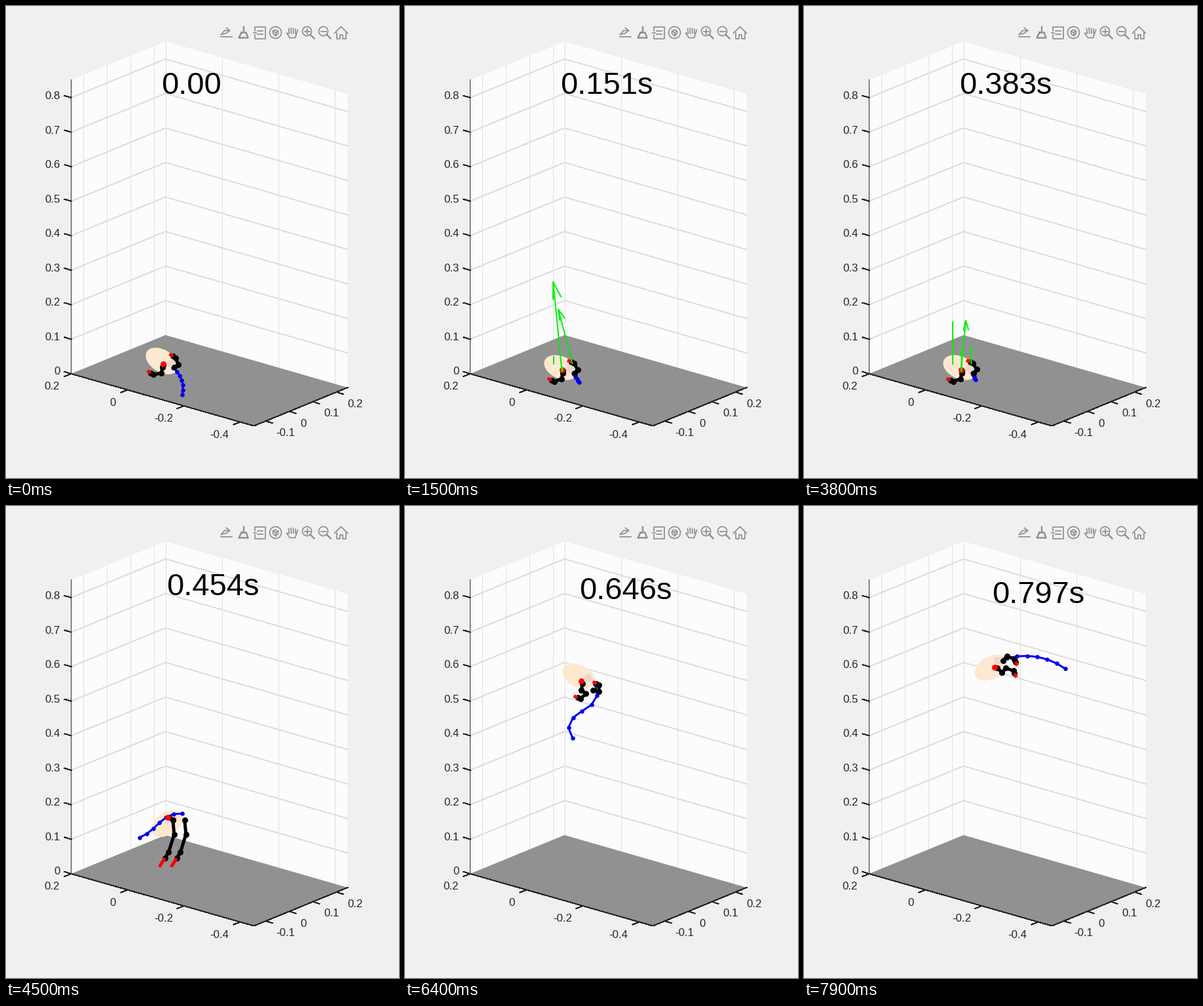
Animation, 600 px wide and 720 px high, one loop 8 s. Source, as a matplotlib script:

```python
import numpy as np
import matplotlib.pyplot as plt
from matplotlib.animation import FuncAnimation
from matplotlib.patches import Circle, Ellipse, Polygon

W, H, DPI = 600, 720, 100
FRAMES, INTERVAL = 80, 100
PX = 72 / DPI  # points per pixel

PAGE, WALL, FLOOR = "#f0f0f0", "#fcfcff", "#919191"
GRID, INK, ICON = "#dfdfe2", "#262626", "#8e8e8e"
SKIN, THIGH = "#fee9d0", "#f0d6cc"

LANDING, PUSH, TAKEOFF = 6, 38, 45

plt.rcParams["font.family"] = "Liberation Sans"
fig = plt.figure(figsize=(W / DPI, H / DPI), dpi=DPI, facecolor=PAGE)
ax = fig.add_axes([0, 0, 1, 1])
ax.set_xlim(-0.5, W - 0.5)
ax.set_ylim(H - 0.5, -0.5)
ax.axis("off")


def stroke(pts, color, width=1.0, z=2, **kw):
    x, y = zip(*pts) if len(pts) else ((), ())
    return ax.plot(x, y, color=color, lw=width * PX, zorder=z, **kw)[0]


def label(x, y, s, size=16.7, color=INK, **kw):
    return ax.text(x, y, s, fontsize=size * PX, color=color, zorder=3, **kw)


# ---- axes box ----
LEFT, BACK, RIGHT, FRONT = (99, 560.5), (243, 501.5), (521, 581.5), (378, 640)
HEIGHT, STEP = 448, 52.65


def mix(p, q, u):
    return p[0] + (q[0] - p[0]) * u, p[1] + (q[1] - p[1]) * u


def up(p, h):
    return p[0], p[1] - h


def crisp(pts, color, **kw):
    stroke(pts, color, 1, antialiased=False, **kw)


def tick(p, dx, dy, text, x, y, ha="center"):
    crisp([p, (p[0] + dx, p[1] + dy)], INK)
    label(x, y, text, ha=ha, va="center_baseline")


def draw_box():
    for a, b in ((LEFT, BACK), (BACK, RIGHT)):
        ax.add_patch(Polygon([a, b, up(b, HEIGHT), up(a, HEIGHT)], fc=WALL, ec="none", zorder=0))
    for h in STEP * np.arange(1, 9):
        crisp([up(p, h) for p in (LEFT, BACK, RIGHT)], GRID, z=1)
    for i in range(4):
        for p in (mix(LEFT, BACK, (18 + 36 * i) / 144), mix(BACK, RIGHT, 86 * i / 278)):
            crisp([p, up(p, HEIGHT)], GRID, z=1)
    ax.add_patch(Polygon([LEFT, BACK, RIGHT, FRONT], fc=FLOOR, ec="none", zorder=1.5))
    crisp([up(LEFT, HEIGHT), LEFT, FRONT, RIGHT], INK)

    for k in range(9):
        tick(up(LEFT, k * STEP), -10, -3, f"{k / 10:g}", 82.5, 556 - 52.55 * k, "right")
    for i in range(4):
        tick(mix(LEFT, FRONT, i * 86 / 279), -10, 4, f"{(1 - i) / 5:g}",
             70 + 85 * i + 8 * (i == 1), 578.5 + 24.7 * i)
        tick(mix(FRONT, RIGHT, (18 + 36 * i) / 143), 10, 3, f"{(i - 1) / 10:g}",
             426 + 35.5 * i - 8 * (i == 1), 650 - 15 * i)


# ---- toolbar ----
def icon(*lines, w=1.7):
    for pts in lines:
        stroke(pts, ICON, w, 3)


def ring(x, y, r):
    ax.add_patch(Circle((x, y), r, fc="none", ec=ICON, lw=1.7 * PX, zorder=3))


def draw_toolbar():
    icon([(327, 46), (344, 46)], [(328, 43), (333, 37), (341, 37)],
         [(336, 33), (341, 37), (336, 41), (328, 43)])
    icon([(362, 31), (362, 39)], [(359, 40), (366, 40), (369, 48), (355, 48), (359, 40)], w=2.4)
    icon([(379, 37), (379, 31), (395, 31), (395, 49), (379, 49), (379, 43)],
         [(377, 40), (381, 40)], [(383, 37), (391, 37)], [(383, 42), (391, 42)])
    ring(411, 40, 9)
    ring(411, 40, 4)
    icon([(411, 40), (411, 45)], [(407, 38), (411, 40), (415, 38)])
    icon([(431, 41), (428, 41), (433, 48), (441, 48), (445, 36)],
         *[[(431 + 3.5 * i, 33 + abs(i - 1.2)), (432 + 3.2 * i, 41)] for i in range(4)])
    for x in (459, 484):
        ring(x, 38, 7)
        icon([(x + 5, 43), (x + 11, 49)], w=2.4)
        icon([(x - 4, 38), (x + 4, 38)])
    icon([(459, 34), (459, 42)])
    icon([(501, 41), (511, 31), (521, 41)],
         [(504, 40), (504, 49), (509, 49), (509, 43), (513, 43), (513, 49), (518, 49), (518, 40)])


# ---- motion, with stage points as complex numbers ----
def lerp(n, *keys):
    t, v = zip(*keys)
    return np.interp(n, t, v)


def turn(degrees):
    return np.exp(1j * np.radians(degrees))


def drift(n):
    return lerp(n, (PUSH, 0), (52, 16), (64, 29), (79, 50))


def height(n):
    if n < PUSH:
        return min(541 + 0.26 * n * n, 551)  # drop onto the floor
    if n < TAKEOFF:
        return 551 - 67 * ((n - PUSH) / (TAKEOFF - PUSH)) ** 2
    m = n - 52
    return 374 - 9.583 * m + 0.3228 * m * (m - 12)  # free flight


def body_at(n):
    angle = lerp(n, (0, 32), (15, 24), (PUSH, 24), (52, -90), (64, 27), (79, -30))
    return 237.5 + 0.95 * drift(n) + 1j * height(n), angle


def hips(n):
    """Near and far hip; the pair twists late in the flight."""
    c, a = body_at(n)
    mid = c + turn(a) * lerp(n, (PUSH, 14 + 3j), (52, 22 + 8j), (64, 21 + 13j), (79, 16 + 7j))
    half = 9 * turn(lerp(n, (64, 0), (79, -85)))
    return mid - half, mid + half


def leg(n, hip, side):
    """Hip, knee, ankle and toe; side squeezes the leg across the body."""
    a = body_at(n)[1]
    kick = np.exp(-((n - TAKEOFF) / 3) ** 2)
    thigh = lerp(n, (PUSH, 75), (52, 80), (64, 11), (79, -15)) + 40 * kick
    fold = lerp(n, (PUSH, 105), (52, 85), (64, 166), (79, 110)) * (1 - 0.6 * kick)
    bones = np.array([9, 12, 11]) * (1 + 1.4 * kick) * turn(thigh + fold * np.array([0, 0.6, 1]))
    bones = bones.real + 1j * side * bones.imag
    return hip + turn(a) * np.append(0, np.cumsum(bones))


def arm(n, hip):
    reach = lerp(n, (PUSH, 0.4), (52, 1))
    return hip + turn(body_at(n)[1]) * reach * np.array([0, -3 - 9j, -6 - 12j])


def tail_points(n):
    c, a = body_at(n)
    root = c + turn(a) * lerp(n, (PUSH, 20.5), (TAKEOFF, 28))
    swing = lerp(n, (0, 72), (15, 57), (PUSH, 62), (TAKEOFF, 165), (52, 212), (64, 434), (79, 730))
    hump = lerp(n, (PUSH, 0), (52, -55), (64, 75), (79, 0))
    curl = lerp(n, (0, 58), (15, 0), (PUSH, 0), (52, -50), (64, -12), (79, 43))
    size = lerp(n, (0, 7.6), (9, 6.6), (15, 2.8), (PUSH, 2), (47, 16), (64, 17), (79, 15.6))
    s = np.linspace(0, 1, 6)
    heads = swing + hump * np.sin(np.pi * s) + curl * (s - 0.5)
    return root + np.append(0, np.cumsum(size * turn(heads)))


# ground forces: base, steady pull, share of the landing shock, share of the push
FORCES = ((239 + 556j, 8 - 75j, 1, 1), (255 + 545j, -22j, 1, 0.5),
          (226 + 545j, -64j, 0, 0), (240 + 556j, -30j, 0, 0))


def force(n, steady, shock, push):
    vec = shock * (-95 - 270j) * np.exp((LANDING - n) / 6)
    vec += push * (185 - 70j) * np.clip((n - PUSH) / 6, 0, 1) ** 4
    return vec + steady * (1 if shock else np.clip((n - 14) / 6, 0, 1))


def arrow(base, vec, head):
    tip = base + vec
    barbs = [tip - vec * (0.19 + 0.02j), tip, tip - vec * (0.17 - 0.07j)]
    return [base, tip] + barbs * head


# ---- moving parts ----
draw_box()
draw_toolbar()
clock = label(0, 0, "", 47.2, "black")
body = ax.add_patch(Ellipse((0, 0), 54, 34, fc=SKIN, ec="none", zorder=4))
spot = ax.add_patch(Circle((0, 0), 6, fc=THIGH, ec="none", zorder=4.1))
tail = stroke([], "#0000ee", 3, 5, marker="o", ms=6.5 * PX, mew=0)
bones = [stroke([], "black", 5, 6, marker="o", ms=9 * PX, mew=0) for _ in range(3)]
feet = [stroke([], "red", 5, 7, solid_capstyle="butt") for _ in range(2)]
paw = stroke([], "red", 1, 7, marker="o", ms=9 * PX, mew=0)
arrows = [stroke([], "#00f000", 2, 8) for _ in FORCES]


def place(line, z):
    z = np.atleast_1d(z)
    line.set_data(z.real, z.imag)


def update(n):
    d = drift(n)
    clock.set_position((237 + d, 133 + 0.28 * d))
    clock.set_text(f"{n * 0.01009:.3g}s" if n else "0.00")

    c, a = body_at(n)
    body.set_center((c.real, c.imag))
    body.set_angle(a)
    s = c + turn(a) * (14 - 4j)
    spot.set_center((s.real, s.imag))
    place(tail, tail_points(n))

    near, far = hips(n)
    side = np.clip(-a / 30, -0.8, 1)  # the far leg swaps sides as the body pitches
    for bone, foot, z in zip(bones, feet, (leg(n, far, side), leg(n, near, 1))):
        heel = z[2] + 0.4 * (z[3] - z[2])
        place(bone, [*z[:3], heel])
        place(foot, [heel, z[3]])
    z = arm(n, near)
    place(bones[2], z[:2])
    place(paw, z[2])

    for line, (base, steady, shock, push) in zip(arrows, FORCES):
        vec = force(n, steady, shock, push)
        line.set_visible(LANDING <= n < TAKEOFF and abs(vec) > 3)
        place(line, arrow(base, vec, head=base.real != 226))
    return [clock, body, spot, tail, paw, *bones, *feet, *arrows]


anim = FuncAnimation(fig, update, frames=FRAMES, interval=INTERVAL, repeat=True,
                     repeat_delay=0, blit=False)
plt.show()
```
